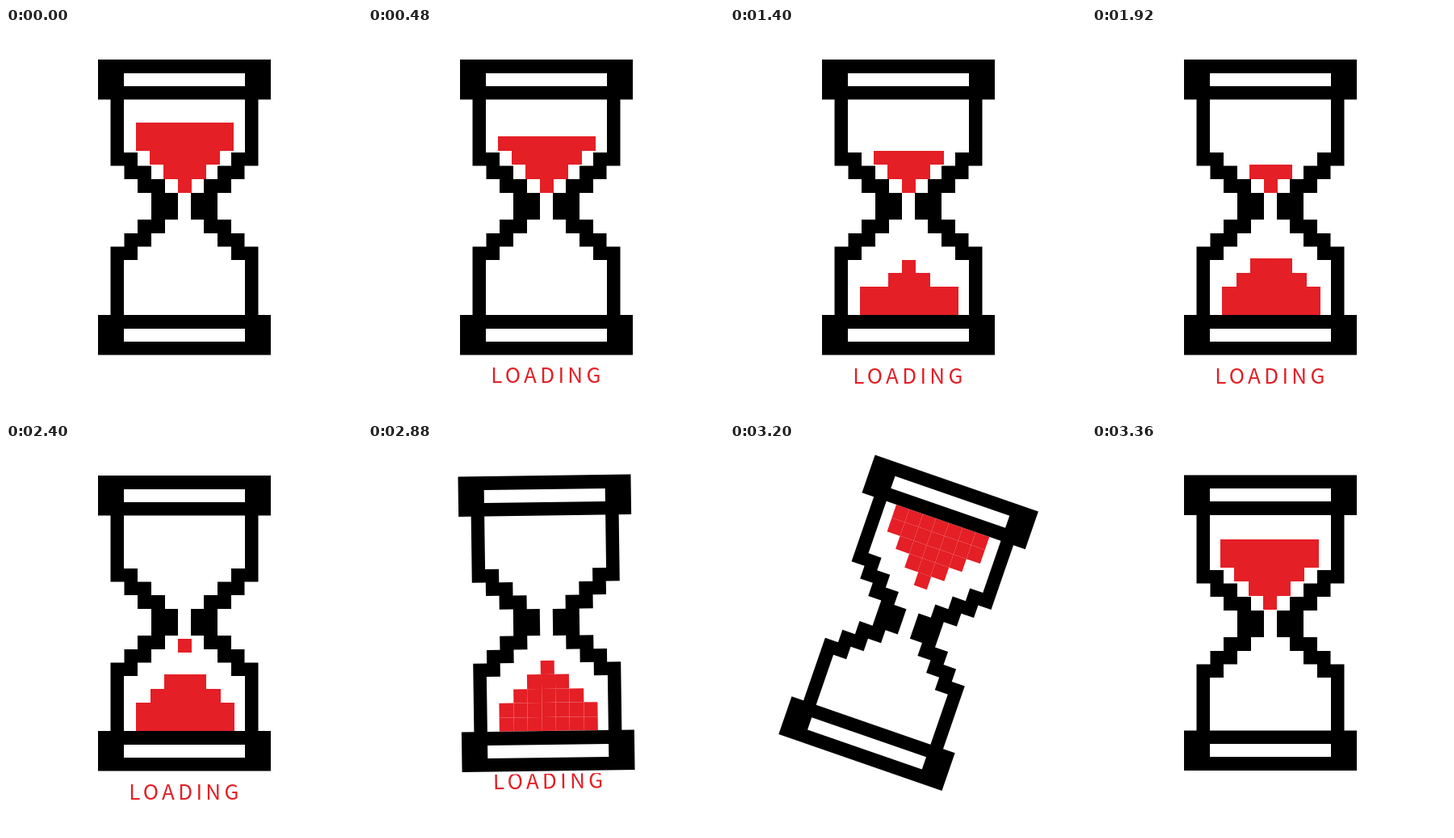
Recreate the animation shown at these times as an HTML page. Size 441x480 px, loop 3.4 s.

```html
<!DOCTYPE html>
<html lang="en">
<head>
<meta charset="utf-8">
<title>Hourglass loader</title>
<style>
  html, body { margin: 0; width: 100%; height: 100%; overflow: hidden; background: #fff; }
  svg { display: block; width: 441px; height: 480px; }
  .sand, text { fill: #e41f26; }
  text {
    font: 400 26px "Noto Sans CJK SC", "Noto Sans CJK JP", "Noto Sans CJK", "Open Sans", sans-serif;
    letter-spacing: 4.3px;
    text-anchor: middle;
  }
</style>
</head>
<body>
<svg viewBox="0 0 441 480">
  <defs>
    <clipPath id="slot"><rect x="100" y="408" width="242" height="60"/></clipPath>
    <path id="wall" d="M129.5 80H146V154H163V170.5H180V187H197V204H213V237H197V254H180V270.5H163V287H146V360
      H129.5V270.5H146.5V254H163V237H180V204H163V187H146.5V170.5H129.5Z"/>
    <path id="cap" d="M114 39H328V88.5H114ZM146 56V72H296V56Z"/>
  </defs>
  <g id="glass">
    <g clip-path="url(#slot)"><text id="label" x="222.4" y="439.5">LOADING</text></g>
    <g id="sand" class="sand"></g>
    <use href="#wall"/>
    <use href="#wall" transform="matrix(-1 0 0 1 442 0)"/>
    <use href="#cap"/>
    <use href="#cap" y="316"/>
  </g>
</svg>
<script>
const LOOP = 3400, TICK = 40, CELL = 17.4, COLS = 7, MID = 3;
const DRAIN_START = 120, DRAIN_STEP = 135;      // one upper cell is used per step
const FILL_START = 680, FILL_END = 1880, RINGS = 12;
const $ = id => document.getElementById(id);
const glass = $('glass'), sand = $('sand'), label = $('label');

const edge = (origin, i) => Math.round(origin + CELL * i);
const rowWidth = i => Math.min(COLS, 9 - 2 * i);

// One grid square; left and top are the grid's origin
function cell(left, top, col, row) {
  const r = document.createElementNS('http://www.w3.org/2000/svg', 'rect');
  const x = edge(left, col), y = edge(top, row);
  r.setAttribute('x', x);
  r.setAttribute('y', y);
  r.setAttribute('width', edge(left, col + 1) - x);
  r.setAttribute('height', edge(top, row + 1) - y);
  sand.append(r);
  return r;
}

function rowCells(left, top, row, width) {
  const first = (COLS - width) / 2;
  return Array.from({ length: width }, (_, i) =>
    ({ el: cell(left, top, first + i, row), reach: Math.abs(first + i - MID) }));
}

// Upper rows vanish once all their cells have drained
const upper = [];
let tipTime = DRAIN_START;
for (let i = 0; i < 5; i++) {
  if (i) tipTime += DRAIN_STEP * rowWidth(i);
  upper.push({ cells: rowCells(160.6, 117, i, rowWidth(i)), end: tipTime });
}

// The pile grows row by row, each from the middle outwards in rings
const pile = [];
for (let i = 0, ring = 0; i < 4; i++) {
  const width = rowWidth(i);
  pile.push({ cells: rowCells(161.3, 268, 4 - i, width), ring, y: edge(268, 4 - i) });
  ring += (width + 1) / 2;
}
const grain = cell(160.6, 268, MID, 0);

// cubic-bezier(.7, 0, .3, 1) over a time span
function ease(t, start, end) {
  const u = Math.min(1, Math.max(0, (t - start) / (end - start)));
  if (u === 0 || u === 1) return u;
  let lo = 0, hi = 1;
  for (let i = 0; i < 24; i++) {
    const s = (lo + hi) / 2, q = 1 - s;
    if (2.1 * q * q * s + 0.9 * q * s * s + s * s * s < u) lo = s; else hi = s;
  }
  return lo * lo * (3 - 2 * lo);
}

const show = (el, on) => el.setAttribute('visibility', on ? 'visible' : 'hidden');

// Rings landed so far, slowing down towards the top
const ringsAt = t =>
  t < FILL_START ? -1 : RINGS * Math.sqrt((t - FILL_START) / (FILL_END - FILL_START));

// Height of the falling grain, or 0 when there is none
function grainY(t, rings) {
  if (t >= tipTime) return 214 + 27 * Math.min(2, Math.floor((t - tipTime) / 120));
  if (rings < 0 || rings >= RINGS) return 0;
  const top = Math.min(...pile.filter(p => p.ring <= rings).map(p => p.y));
  return 237 + (top - 237) * (1 - (1 - rings % 1) ** 4);
}

function draw(t) {
  const rings = ringsAt(t);
  for (const row of upper) for (const c of row.cells) show(c.el, t < row.end);
  for (const row of pile) for (const c of row.cells) show(c.el, row.ring + c.reach <= rings);

  const y = grainY(t, rings);
  show(grain, y > 0);
  grain.setAttribute('y', Math.round(y));

  const hidden = 1 - ease(t, 240, 500) + ease(t, 2760, 3020);
  label.setAttribute('transform', `translate(0 ${-35 * hidden})`);
  show(label, hidden < 1);

  glass.setAttribute('transform', `rotate(${-180 * ease(t, 2840, 3360)} 221 221.5)`);
  sand.setAttribute('transform', `translate(0 ${-30 * ease(t, 3200, 3360)})`);
}

const start = performance.now();
function frame() {
  const t = (performance.now() - start) % LOOP;
  draw(Math.floor(t / TICK) * TICK);
  requestAnimationFrame(frame);
}
frame();
</script>
</body>
</html>
```
